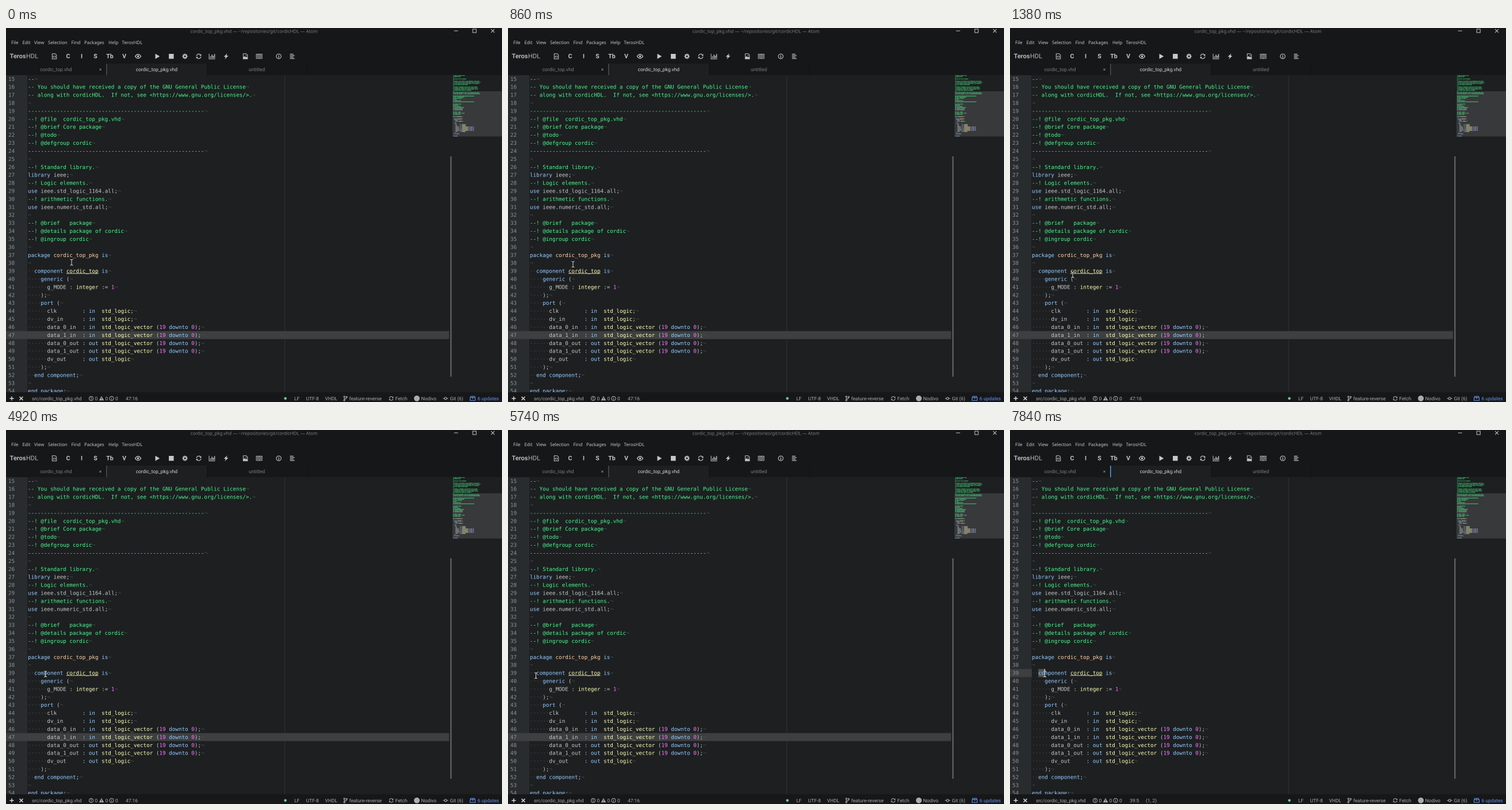
An HTML page with a canvas that plays this animation: 862x650 px, repeating every 8000 ms.

```html
<!DOCTYPE html>
<html lang="en">
<head>
<meta charset="utf-8">
<title>Code editor</title>
<style>
html, body { margin: 0; height: 100%; overflow: hidden; background: #161719; }
canvas { display: block; width: 862px; height: 650px; }
</style>
</head>
<body>
<canvas id="stage" width="1724" height="1300"></canvas>
<script>
// The canvas is twice the stage size so that text can sit between whole pixels.
const ctx = document.getElementById('stage').getContext('2d');
ctx.scale(2, 2);
const LOOP = 8000, LEFT = 38, TOP = 82, ROW_TOP = 81.6, ROW = 13.91, COL = 5.572, FIRST = 15;
const MONO = '9.255px "DejaVu Sans Mono", monospace';
const UI = '8.45px Roboto, sans-serif';
const MENU = '7.9px "Noto Sans", sans-serif';
const BAR = '#161719', EDITOR = '#1d1f21', TEXT = '#c5c8c6', SOFT = '#a9adae', LIT = '#3d3f40';
const GREEN = '#4bf78d', BLUE = '#96cbfe', YELLOW = '#ffffb6', PINK = '#ff73fd', ORANGE = '#ffd2a7';
const dashes = '-'.repeat(55);

const lines = `-- CORDIC core package in VHDL
-- Copyright notice
--
-- This file is part of cordicHDL.
--
-- cordicHDL is free software: you can redistribute it and/or modify
-- it under the terms of the GNU General Public License as published by
-- the Free Software Foundation, either version 3 of the License, or
-- (at your option) any later version.
--
-- cordicHDL is distributed in the hope that it will be useful,
-- but WITHOUT ANY WARRANTY; without even the implied warranty of
-- MERCHANTABILITY or FITNESS FOR A PARTICULAR PURPOSE.  See the
-- GNU General Public License for more details.
--
-- You should have received a copy of the GNU General Public License
-- along with cordicHDL.  If not, see <https://www.gnu.org/licenses/>.

${dashes}
--! @file  cordic_top_pkg.vhd
--! @brief Core package
--! @todo
--! @defgroup cordic
${dashes}

--! Standard library.
library ieee;
--! Logic elements.
use ieee.std_logic_1164.all;
--! arithmetic functions.
use ieee.numeric_std.all;

--! @brief   package
--! @details package of cordic
--! @ingroup cordic

package cordic_top_pkg is

  component cordic_top is
    generic (
      g_MODE : integer := 1
    );
    port (
      clk        : in  std_logic;
      dv_in      : in  std_logic;
      data_0_in  : in  std_logic_vector (19 downto 0);
      data_1_in  : in  std_logic_vector (19 downto 0);
      data_0_out : out std_logic_vector (19 downto 0);
      data_1_out : out std_logic_vector (19 downto 0);
      dv_out     : out std_logic
    );
  end component;

end package;`.split('\n');

function colorOf(word) {
  if (/^(library|use|package|is|component|generic|port|in|out|downto|end)$/.test(word)) return BLUE;
  if (/^(integer|std_logic|std_logic_vector|cordic_top)$/.test(word)) return YELLOW;
  if (word === 'cordic_top_pkg') return ORANGE;
  return /^\d+$/.test(word) ? PINK : TEXT;
}

function tokenize(line) {
  if (line.startsWith('--')) return [{ text: line, col: 0, color: GREEN }];
  return [...line.matchAll(/\w+|[^\w\s]+/g)]
    .map(m => ({ text: m[0], col: m.index, color: colorOf(m[0]) }));
}
const tokens = lines.map(tokenize);

function rect(x, y, w, h, color) {
  ctx.fillStyle = color;
  ctx.fillRect(x, y, w, h);
}

function text(str, x, y, color, font = UI, align = 'left') {
  ctx.font = font;
  ctx.textAlign = align;
  ctx.fillStyle = color;
  ctx.fillText(str, x, y);
}

function icon(x, y, path, { fill = false, width = 1, scale = 1, color = TEXT } = {}) {
  ctx.save();
  ctx.translate(x, y);
  ctx.scale(scale, scale);
  ctx.fillStyle = ctx.strokeStyle = color;
  ctx.lineWidth = width;
  const shape = new Path2D(path);
  fill ? ctx.fill(shape) : ctx.stroke(shape);
  ctx.restore();
}

const ring = r => `M${-r} 0A${r} ${r} 0 1 1 ${r} 0A${r} ${r} 0 1 1 ${-r} 0Z`;
const SYNC = 'M-3.8-.5A3.8 3.8 0 0 1 3-2.4M3.8 .5A3.8 3.8 0 0 1-3 2.4';
const SYNC_TIPS = 'M4.4-4V-.8H1.2ZM-4.4 4V.8H-1.2Z';
const INFO = 'M0-.8V2.6M0-2.6V-1.5';
const CROSS = 'M-3-3L3 3M3-3L-3 3';

function sync(x, y, scale, color) {
  icon(x, y, SYNC, { scale, color, width: 1.2 });
  icon(x, y, SYNC_TIPS, { scale, color, fill: true });
}

function drawHeader() {
  text('cordic_top_pkg.vhd — ~/repositories/git/cordicHDL — Atom', 431, 8.5, '#7b7e80', MENU, 'center');
  icon(782.2, 5, 'M-3.5 0H3.5');
  icon(814.2, 5, 'M-3-3H3V3H-3Z');
  icon(846, 5, CROSS);

  const menu = [['File', 9], ['Edit', 28.5], ['View', 49], ['Selection', 73], ['Find', 113.5],
    ['Packages', 136], ['Help', 178], ['TerosHDL', 201.5]];
  for (const [label, x] of menu) text(label, x, 28, TEXT, MENU);

  text('Teros', 6.5, 52.7, '#b5b8ba', 'bold 11px Roboto, sans-serif');
  text('HDL', 35, 52.7, '#b5b8ba', '11px Roboto, sans-serif');
  for (const [label, x] of [['C', 108], ['I', 131.5], ['S', 155.5], ['Tb', 180.5], ['V', 205.5]])
    text(label, x, 52.7, TEXT, 'bold 10.5px Roboto, sans-serif', 'center');

  const y = 49.2;
  icon(84, y, 'M-3.7-4.5H1.5L3.7-2.3V4.5H-3.7ZM-.7-1L-2 .7L-.7 2.4M.7-1L2 .7L.7 2.4');
  icon(229.5, y, 'M-5 0Q0-7 5 0Q0 7-5 0Z', { width: 1.3 });
  icon(229.5, y, ring(1.7), { fill: true });
  icon(263, y, 'M-3.5-4.5L4.2 0L-3.5 4.5Z', { fill: true });
  rect(283, 45, 8.5, 8.5, TEXT);
  icon(311, y, ring(2.5), { width: 1.9 });
  icon(311, y, 'M0-4.7V-3M0 3V4.7M-4.7 0H-3M3 0H4.7M-3.3-3.3L-2-2M2 2L3.3 3.3M-3.3 3.3L-2 2M2-2L3.3-3.3', { width: 1.7 });
  sync(335, y, 1, TEXT);
  icon(358, y, 'M-5-4.5V4.5H5.5');
  icon(358, y, 'M-2.5 0V3M0-3V3M2.3-1V3M4.5-4V3', { width: 1.4 });
  icon(382.5, y, 'M2-5L-4 .8H-.8L-2.2 5L4-1H.8Z', { fill: true });
  icon(416, y, 'M-3.7-4.5H1.5L3.7-2.3V4.5H-3.7Z');
  icon(416, y, 'M-3.5 4V2L-1.5-.5L.5 1.7L1.7 .5L3.5 2.5V4ZM.6-2H2V-.6H.6Z', { fill: true });
  icon(440, y, 'M-5-3.7H5V3.7H-5ZM0-3.7V4.5M-3.8-1.7H-1.2M-3.8 0H-1.2M-3.8 1.7H-1.2M1.2-1.7H3.8M1.2 0H3.8M1.2 1.7H3.8', { width: .9 });
  icon(474, y, ring(4.2), { width: 1.1 });
  icon(474, y, INFO, { width: 1.3 });
  icon(497.5, y, 'M-4-3.7H2M-4-1.2H4M-4 1.3H2M-4 3.8H4', { width: 1.2 });
}

function drawTabs(focused) {
  rect(175, 62, 174, 20, EDITOR);
  rect(349, 62, 1, 20, '#121315');
  rect(523, 62, 1, 20, '#121315');
  rect(174, 62, 1.5, 20, focused ? '#4f9fee' : '#4b4e50');
  text('cordic_top.vhd', 87, 75, '#7b7e80', UI, 'center');
  text('×', 164, 75, '#a0a2a4', UI, 'center');
  text('cordic_top_pkg.vhd', 261.8, 75, '#d4d6d7', UI, 'center');
  text('untitled', 436, 75, '#7b7e80', UI, 'center');
}

function drawEditor(state) {
  ctx.save();
  ctx.beginPath();
  ctx.rect(0, TOP, 862, 551);
  ctx.clip();
  rect(0, TOP, 862, 551, EDITOR);
  rect(0, TOP, LEFT - 1, 551, '#292c2f');
  rect(484, TOP, 1, 551, '#2f3133');

  const litY = ROW_TOP + (state.line - FIRST) * ROW;
  rect(0, litY, state.selected ? LEFT : 770, ROW, LIT);
  if (state.selected) rect(LEFT + 2 * COL, litY, 2 * COL, ROW, '#505355');

  for (let n = FIRST; n <= lines.length; n++) {
    const line = lines[n - 1], y = ROW_TOP + (n - FIRST) * ROW + 10.15;
    text(n, 4, y, '#8f9292', MONO);
    const indent = line.search(/\S|$/);
    text('·'.repeat(indent), LEFT, y, '#4b4d4f', MONO);
    text('¬', LEFT + line.length * COL, y, '#4b4d4f', MONO);
    for (const t of tokens[n - 1]) {
      text(t.text, LEFT + t.col * COL, y, t.color, MONO);
      if (t.text === 'cordic_top') rect(LEFT + t.col * COL, y + .8, 10 * COL, .8, YELLOW);
    }
  }
  if (state.caret) rect(LEFT + state.caret * COL - .4, litY, 1.2, ROW, '#fff');
  rect(772, 223, 2.5, 383, '#5a5c5e');
  drawMinimap();
  ctx.restore();
}

function drawMinimap() {
  rect(776, 110, 86, 78.5, '#37393b');
  ctx.globalAlpha = .6;
  tokens.forEach((row, i) => {
    for (const t of row)
      for (const m of t.text.matchAll(/\S+/g))
        rect(777 + (t.col + m.index) * .67, 82 + i * 1.985, m[0].length * .67, 1.25, t.color);
  });
  ctx.globalAlpha = 1;
}

function drawStatus(state) {
  const y = 643.8, base = 646.8, color = SOFT;
  icon(10, y, 'M-3.6 0H3.6M0-3.6V3.6', { width: 1.5, color: '#d4d6d7' });
  icon(26.5, y, CROSS, { width: 1.5, color: '#d4d6d7' });
  text('src/cordic_top_pkg.vhd', 45, base, color, '8.35px Roboto, sans-serif');

  icon(148, y, ring(3.6), { color });
  icon(148, y, 'M0-2.3V.5M0 1.3V2.3', { color, width: 1.2 });
  icon(166, y, 'M0-4L4.3 3.5H-4.3Z', { color, fill: true });
  icon(166, y, 'M0-1.5V1M0 1.7V2.7', { color: BAR });
  icon(183.5, y, ring(3.6), { color });
  icon(183.5, y, INFO, { color, scale: .85 });
  for (const x of [154.5, 172.5, 190]) text('0', x, base, color);
  text(state.position, 208, base, color);
  if (state.selected) text('(1, 2)', 236, base, color);

  icon(485.5, y, ring(2.3), { fill: true, color: '#73c990' });
  const labels = [['LF', 501], ['UTF-8', 521.5], ['VHDL', 554.5], ['feature-reverse', 596.5],
    ['Fetch', 676.5], ['Nodivo', 721.5], ['Git (6)', 771.5]];
  for (const [label, x] of labels) text(label, x, base, color);

  icon(590, y, 'M-2-2V2.2M2-1.4Q2 .8-2 1.2', { color, width: 1.1 });
  for (const [x, dy] of [[588, -3], [588, 3.2], [592, -2.5]]) icon(x, y + dy, ring(1.1), { color });
  sync(669.5, y, .85, color);
  icon(714, y, ring(5), { fill: true, color });
  icon(764, y, ring(2) + 'M-4.5 0H-2M2 0H4.5', { color, width: 1.2 });

  const blue = '#6494ed';
  icon(811, y, 'M-4.5-1.5H4.5V3.5H-4.5ZM-3.5-1.5V-3.5H3.5V-1.5M0-3.5V1', { color: blue });
  text('6 updates', 819.5, base, blue);
}

// Pointer stops: time, x, y. Only the first stretch glides, later ones jump.
const stops = [[0, 114, 407.3], [700, 114, 407.3], [860, 113, 410.7], [940, 113, 410.7],
  [1380, 109, 428.7], [4920, 68.7, 424], [5300, 56.2, 426.3], [5740, 48.5, 426.8],
  [7420, 54, 427.5], [7840, 60.5, 424]];

function pointerAt(time) {
  const i = stops.findLastIndex(s => s[0] <= time);
  const [t, x, y] = stops[i];
  if (t >= 1380) return [x, y];
  const [t2, x2, y2] = stops[i + 1], p = (time - t) / (t2 - t);
  return [x + (x2 - x) * p, y + (y2 - y) * p];
}

function drawPointer(x, y) {
  const beam = 'M-2.5-5Q-.5-5 0-4Q.5-5 2.5-5M0-4V4M-2.5 5Q-.5 5 0 4Q.5 5 2.5 5';
  icon(x, y, beam, { width: 2, color: 'rgba(0,0,0,.6)' });
  icon(x, y, beam, { color: '#e8e8e8' });
}

function draw(time) {
  const clicked = time >= 7420, selected = time >= 7840;
  const state = {
    selected,
    line: clicked ? 39 : 47,
    caret: selected ? 4 : clicked ? 2 : 0,
    position: selected ? '39:5' : clicked ? '39:3' : '47:16'
  };
  ctx.textRendering = 'geometricPrecision';
  rect(0, 0, 862, 650, BAR);
  drawHeader();
  drawTabs(clicked);
  drawEditor(state);
  drawStatus(state);
  drawPointer(...pointerAt(time));
}

const start = performance.now();
function tick() {
  draw((performance.now() - start) % LOOP);
  requestAnimationFrame(tick);
}
tick();
</script>
</body>
</html>
```
